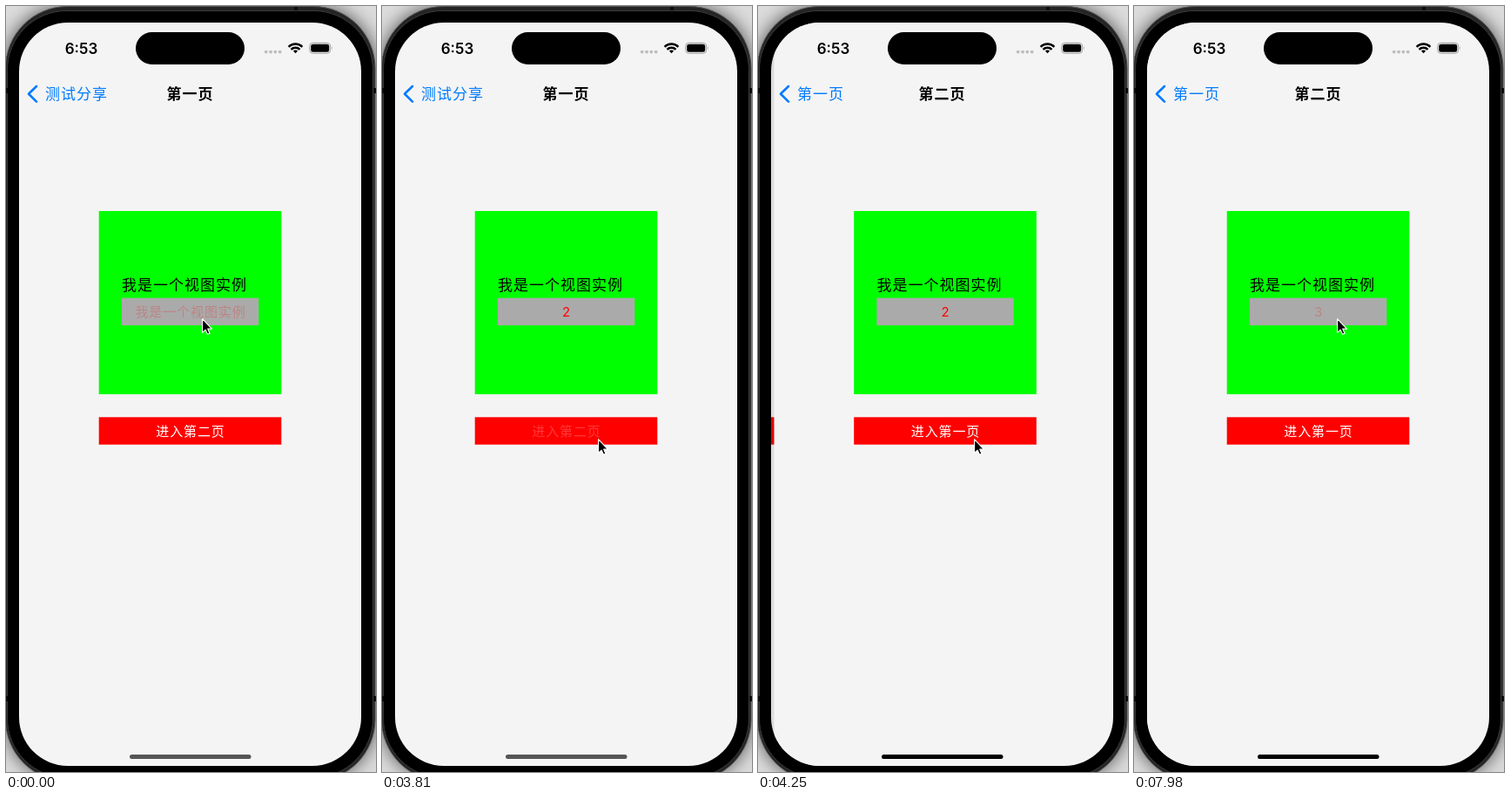
Recreate the animation shown at these times as an HTML page. Size 425 by 878 pixels, loop 8000 ms.

```html
<!DOCTYPE html>
<html lang="zh-CN">
<head>
<meta charset="utf-8">
<title>Page push</title>
<style>
  html, body { margin: 0; width: 100%; height: 100%; overflow: hidden; }
  svg { display: block; width: 425px; height: 878px; }
  text { font: 17px "Noto Sans CJK SC", "Noto Sans CJK", sans-serif; letter-spacing: 1px; }
  .small { font-size: 15px; letter-spacing: .9px; }
  .mid { text-anchor: middle; }
  .bold { font-weight: 600; }
  .blue { fill: #007aff; }
  .latin { font-family: Inter, sans-serif; letter-spacing: 0; }
</style>
</head>
<body>
<svg viewBox="0 0 425 878">
  <defs>
    <clipPath id="screen"><rect x="15" y="19" width="393" height="852" rx="56"/></clipPath>
    <clipPath id="navClip"><rect x="28" y="80" width="380" height="40"/></clipPath>
    <filter id="blur"><feGaussianBlur stdDeviation="10"/></filter>
  </defs>

  <!-- phone body -->
  <rect width="425" height="878" fill="#dcdcdc"/>
  <rect x="-1" y="0" width="426" height="888" rx="70" opacity=".6" filter="url(#blur)"/>
  <rect x="-.5" y=".5" width="424.5" height="888" rx="71" fill="#242424" stroke="#555"/>
  <rect x="1.5" y="5.5" width="420" height="879" rx="68" stroke="#3c3c3c"/>
  <path d="M333 1v4M0 94v6M424 94v6M0 791v6M424 791v6" stroke="#0c0c0c" stroke-width="4"/>

  <g clip-path="url(#screen)">
    <g id="page1">
      <rect x="15" y="19" width="393" height="852" fill="#f4f4f4"/>
      <rect x="106.7" y="471.3" width="209.6" height="31.4" fill="#f00"/>
      <text id="enter" class="small mid" x="212" y="492.5" fill="#fff">进入第二页</text>
    </g>
    <rect id="shade" x="15" y="19" width="393" height="852"/>
    <g id="page2">
      <rect x="15" y="19" width="393" height="852" fill="#f4f4f4"/>
      <rect x="106.7" y="471.3" width="209.6" height="31.4" fill="#f00"/>
      <text class="small mid" x="212" y="492.5" fill="#fff">进入第一页</text>
    </g>
    <g id="card">
      <rect x="106.7" y="235" width="209.6" height="210" fill="#0f0"/>
      <text x="133" y="326">我是一个视图实例</text>
      <rect x="132.9" y="334.6" width="157.4" height="31.4" fill="#aaa"/>
      <text id="caption" class="small mid" x="212" y="356" fill="#f00"></text>
    </g>

    <!-- navigation bar -->
    <path d="M35 92L26 100.8L35 109.6" fill="none" stroke="#007aff" stroke-width="2.6" stroke-linecap="round" stroke-linejoin="round"/>
    <g clip-path="url(#navClip)">
      <text id="oldBack" class="blue" y="107">测试分享</text>
      <text id="oldTitle" class="bold" y="107">第一页</text>
      <text id="newBack" class="blue" y="107">第一页</text>
      <text id="newTitle" class="bold" y="107">第二页</text>
    </g>

    <!-- status bar -->
    <rect x="149" y="30" width="125" height="37" rx="18.5"/>
    <text class="latin bold mid" x="86.5" y="54.5">6:53</text>
    <path d="M298.7 52.6h.01m5.3 0h.01m5.3 0h.01m5.3 0h.01" stroke="#bcbcbc" stroke-width="3.8" stroke-linecap="round"/>
    <g fill="none" stroke="#000" stroke-width="2.4">
      <path d="M324.6 46.8A11 11 0 0 1 340.4 46.8M327.5 49.8A7 7 0 0 1 337.5 49.8"/>
      <path d="M332.5 54.2L329.9 51.6A3.8 3.8 0 0 1 335.1 51.6Z" fill="#000" stroke="none"/>
    </g>
    <rect x="348.7" y="42.3" width="24" height="12" rx="3.8" fill="none" stroke="#a0a0a0"/>
    <rect x="350.2" y="43.8" width="21" height="9" rx="2.4"/>
    <path d="M374 46.3q1.7 2 0 4z" fill="#a0a0a0"/>

    <rect id="home" x="142" y="858" width="139.5" height="5" rx="2.5"/>
  </g>

  <path id="cursor" d="M0 0V15.6L3.5 12.4L5.9 17.6L8.4 16.5L6.1 11.4H10.9Z" stroke="#fff" stroke-width="1.1" stroke-linejoin="round"/>
</svg>
<script>
  const $ = id => document.getElementById(id);
  const LOOP = 8000, WIDTH = 393;
  const ticks = [0, 150, 300, 450, 1590, 1880, 2030, 2180, 2320, 2470, 2620, 2760, 2910,
    3810, 3960, 4100, 4250, 4400, 5290, 5440, 5590, 5730, 5880, 6630, 6780, 6930, 7080, 7980];
  const taps = [[0, 150], [1590, 1880], [6630, 6780], [7980, LOOP]];
  const enterTaps = [[3810, 3930]];

  const clamp = x => Math.min(1, Math.max(0, x));
  const smooth = x => { x = clamp(x); return x * x * (3 - 2 * x); };
  const lerp = (a, b, k) => a + (b - a) * k;
  const move = (id, x, y = 0) => $(id).setAttribute('transform', `translate(${x} ${y})`);

  // A pressed title dims at once and fades back after release.
  function titleAlpha(t, list) {
    const tap = list.filter(([down]) => t >= down).pop();
    if (!tap) return 1;
    return t < tap[1] ? .22 : lerp(.3, 1, clamp((t - tap[1]) / 300));
  }

  // Critically damped spring: distance the new page still has to travel.
  function pushOffset(t) {
    const s = 19 * Math.max(0, t - 3894) / 1000;
    return Math.floor(WIDTH * (1 + s) * Math.exp(-s) * 2) / 2;
  }

  function navText(id, x, alpha) {
    $(id).setAttribute('x', x);
    $(id).setAttribute('opacity', alpha);
  }

  function draw(t) {
    const offset = pushOffset(t), p = 1 - offset / WIDTH, q = smooth(p);

    move('page1', -.3 * WIDTH * p);
    move('page2', offset);
    move('card', p > 0 ? offset : 0);
    $('shade').setAttribute('opacity', .1 * p);

    const slide = lerp(184.5, 45, q);
    navText('oldBack', 45 - 102 * q, 1 - q);
    navText('oldTitle', slide, 1 - q);
    navText('newBack', slide, q * q);
    navText('newTitle', 184.5 + 210 * (1 - q), q * q);

    const caption = $('caption');
    caption.textContent = t < 150 ? '我是一个视图实例' : t < 1880 ? '1' : t < 6780 ? '2' : '3';
    caption.classList.toggle('latin', t >= 150);
    caption.setAttribute('x', t < 150 ? 212 : 211.7);
    caption.setAttribute('opacity', titleAlpha(t, taps));
    $('enter').setAttribute('opacity', titleAlpha(t, enterTaps));
    $('home').setAttribute('fill', p > 0 ? '#000' : '#555');

    const down = smooth((t - 2250) / 650), up = smooth((t - 5220) / 650);
    move('cursor', 225.6 + 23 * down - 15 * up, 358.7 + 138 * (down - up));
  }

  function frame() {
    const now = performance.now() % LOOP;
    draw(ticks.filter(t => t <= now).pop());
    requestAnimationFrame(frame);
  }
  frame();
</script>
</body>
</html>
```
